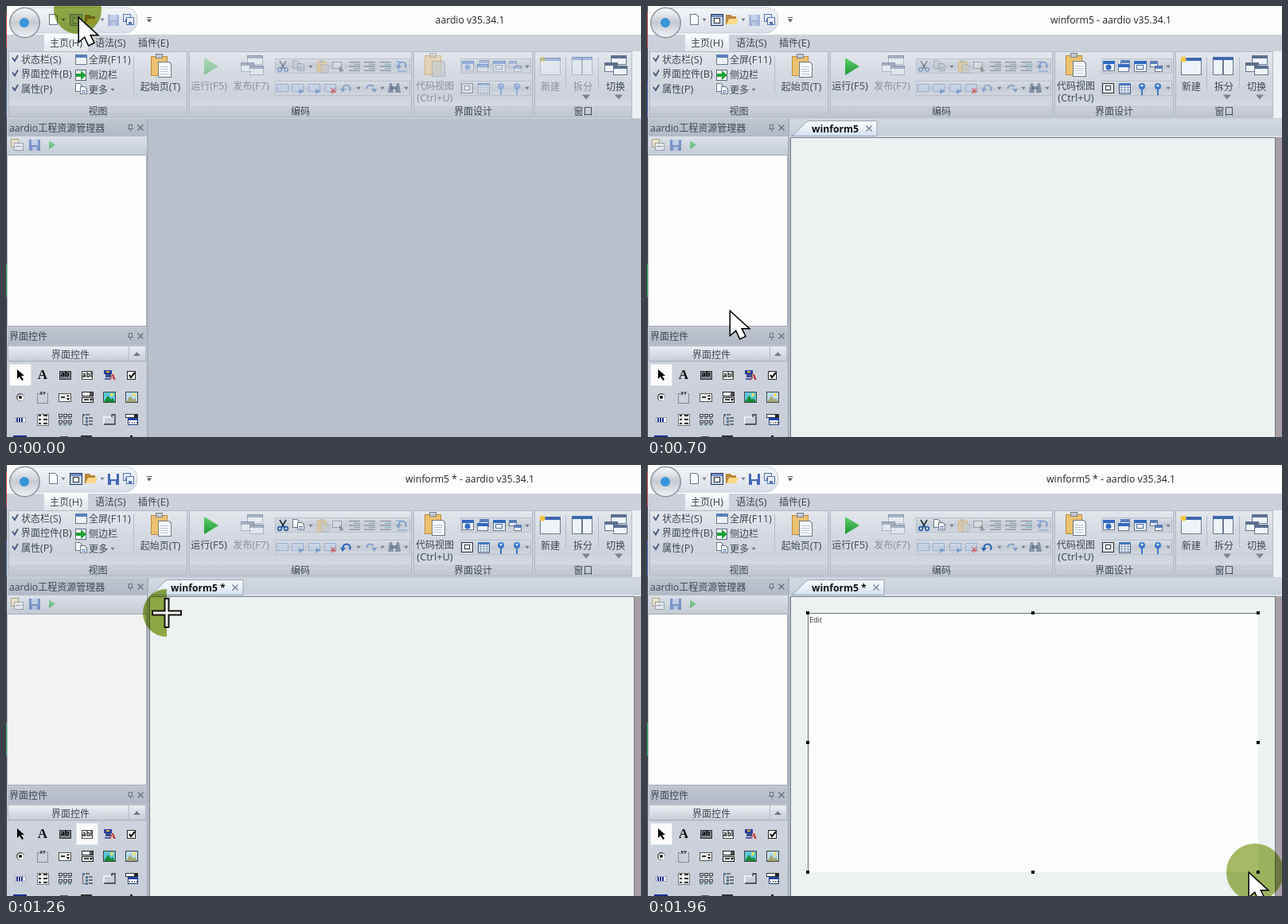
An HTML page with a canvas for the animation above (2100 ms loop, 798 by 542 pixels).

```html
<!DOCTYPE html>
<html lang="zh">
<head>
<meta charset="utf-8">
<style>
html, body { margin: 0; width: 798px; height: 542px; overflow: hidden; background: #b9c0cb; }
canvas { display: block; }
</style>
</head>
<body>
<canvas id="stage" width="798" height="542"></canvas>
<script>
const g = document.getElementById('stage').getContext('2d');
const LOOP = 2100;
const LATIN = '"Open Sans", "Noto Sans", sans-serif';
const CJK = '"Noto Sans CJK SC", "Noto Sans CJK", sans-serif';
const INK = '#3f4753', DIM = '#8b919b', NAVY = '#1c3f7c', OLIVE = '#97b048';

// ---- helpers ----
function rect(x, y, w, h, c) { g.fillStyle = c; g.fillRect(x, y, w, h); }
function frame(x, y, w, h, c) {
  g.strokeStyle = c; g.lineWidth = 1; g.strokeRect(x + .5, y + .5, w - 1, h - 1);
}
function box(x, y, w, h, fill, edge) { rect(x, y, w, h, fill); frame(x, y, w, h, edge); }
function shade(y, h, ...cols) {
  const s = g.createLinearGradient(0, y, 0, y + h);
  cols.forEach((c, i) => s.addColorStop(i / (cols.length - 1), c));
  return s;
}
function path(pts, close) {
  g.beginPath();
  for (let i = 0; i < pts.length; i += 2) g.lineTo(pts[i], pts[i + 1]);
  if (close) g.closePath();
}
function poly(c, ...pts) { path(pts, true); g.fillStyle = c; g.fill(); }
function line(c, w, ...pts) { path(pts); g.strokeStyle = c; g.lineWidth = w; g.stroke(); }
function disc(x, y, r, c) { g.beginPath(); g.arc(x, y, r, 0, 7); g.fillStyle = c; g.fill(); }
function drop(x, y, r = 2.5, c = '#747c89') { poly(c, x - r, y - r / 2, x + r, y - r / 2, x, y + r / 2 + 1); }
function fade(a, fn) { g.save(); g.globalAlpha *= a; fn(); g.restore(); }
function on(flag, fn) { fade(flag ? 1 : .4, fn); }

// Mixed text: Han runs at 12px, the rest at the given size; y is the middle.
function text(s, x, y, { c = INK, mid = false, size = 12.8, bold = '' } = {}) {
  const runs = s.split(/([\u2e80-\u9fff]+)/).filter(Boolean).map(t => {
    const font = /[\u2e80-\u9fff]/.test(t) ? `12px ${CJK}` : `${bold} ${size}px ${LATIN}`;
    g.font = font;
    return { t, font, w: g.measureText(t).width };
  });
  if (mid) x -= runs.reduce((a, r) => a + r.w, 0) / 2;
  g.fillStyle = c;
  g.textBaseline = 'alphabetic';
  for (const r of runs) { g.font = r.font; g.fillText(r.t, x, y + 4.5); x += r.w; }
}
function glyph(s, x, y, font, c = '#111') {
  g.font = font; g.fillStyle = c; g.textAlign = 'center'; g.textBaseline = 'middle';
  g.fillText(s, x, y); g.textAlign = 'left';
}

// ---- icons ----
function win(x, y, w, h, bar = '#5a7fb8') { box(x, y, w, h, '#eef3f9', '#6b788d'); rect(x, y, w, 4, bar); }
function page(x, y, w = 9, h = 12) {
  poly('#6d7888', x, y, x + w - 3, y, x + w, y + 3, x + w, y + h, x, y + h);
  poly('#fafcff', x + 1, y + 1, x + w - 3, y + 1, x + w - 1, y + 4, x + w - 1, y + h - 1, x + 1, y + h - 1);
}
function copy(x, y) { page(x, y, 9, 11); page(x + 6, y + 4, 9, 10); line('#5a7cb5', 1, x + 8, y + 9.5, x + 13, y + 9.5); line('#5a7cb5', 1, x + 8, y + 11.5, x + 13, y + 11.5); }
function form(x, y) { box(x, y, 16, 15, '#6f8fc4', '#24365c'); rect(x + 1, y + 4, 14, 10, '#c9d6ea'); box(x + 4, y + 5, 8, 7, '#fff', '#333'); }
function folder(x, y) { poly('#b98a3c', x, y + 2, x + 6, y + 2, x + 8, y + 4, x + 13, y + 4, x + 13, y + 14, x, y + 14); poly('#f9d988', x + 1, y + 14, x + 4, y + 7, x + 16, y + 7, x + 13, y + 14); }
function disk(x, y, s = 14) { rect(x, y, s, s, '#4468b8'); rect(x + 3, y, s - 6, s * .5, '#eef3fb'); rect(x + 4, y + s * .65, s - 8, s * .35, '#dbe5f5'); }
function clip(x, y, k = 1) {
  g.save(); g.translate(x, y); g.scale(k, k);
  box(0, 3, 21, 25, '#ecc16f', '#b98d40'); box(6, 0, 9, 6, '#c3c9d0', '#7c838e');
  page(9, 10, 17, 20);
  for (let i = 0; i < 4; i++) line('#b3c1d4', 1, 12, 16.5 + i * 3, 22, 16.5 + i * 3);
  g.restore();
}
function pin(x, y) { line('#6b7280', 1, x - 3, y + 1.5, x + 4, y + 1.5); frame(x - 2, y - 4, 5, 6, '#6b7280'); line('#6b7280', 1, x + .5, y + 2, x + .5, y + 5); }
function cross(x, y, r = 3.5, c = '#6b7280') { line(c, 1.4, x - r, y - r, x + r, y + r); line(c, 1.4, x + r, y - r, x - r, y + r); }
function play(x, y, w, h) { poly(shade(y, h, '#5fd06a', '#1f9638'), x, y, x + w, y + h / 2, x, y + h); }
function cascade(x, y) {
  for (const [u, v, w] of [[8, 0, 20], [0, 9, 17], [11, 13, 18]]) win(x + u, y + v, w, 12, '#5d708f');
}
function tick(x, y) { line('#45597a', 1.8, x - 3, y - 2, x, y + 2, x + 4, y - 5); }
function bubble(x, y, i) {
  box(x - 8, y - 5, 15, 10, '#c2d5ef', '#6485b8');
  if (i) poly(i > 2 ? '#cf4b3d' : '#416fb8', x + 1, y + 1, x + 8, y + 4, x + 1, y + 8);
}
function turn(x, y, d) {
  g.beginPath(); g.arc(x, y + 1, 4.5, Math.PI, d * .6 + Math.PI * 2); g.strokeStyle = '#2f66b8'; g.lineWidth = 2.2; g.stroke();
  poly('#2f66b8', x - d * 8, y + 1, x - d * 1, y + 1, x - d * 5, y + 6);
}
function lines(x, y, c) {
  for (let i = 0; i < 5; i++) line(i % 2 ? c : '#3c4656', 1.3, x - (i % 2 ? 1 : 7), y - 5.5 + i * 2.7, x + 7, y - 5.5 + i * 2.7);
}
function strip(x, y, w) { box(x, y, w, 19, shade(y, 19, '#dbdfe6', '#c6ccd5', '#d3d8df'), '#b8bec9'); }

// ---- ribbon ----
function titleBar(s) {
  rect(0, 0, 798, 37, s.hot ? '#f3f3f3' : '#fdfdfd');
  rect(0, 36, 798, 106, shade(36, 106, '#ccd1da', '#c6ccd6'));
  rect(787, 57, 11, 84, '#eef1f4');
  g.beginPath(); g.roundRect(30, 2, 135, 32, [0, 14, 16, 0]);
  g.fillStyle = shade(2, 32, '#f3f5f8', '#d9dee7'); g.fill();
  g.strokeStyle = '#c6ccd6'; g.lineWidth = 1; g.stroke();
  disc(23.5, 21, 19.5, '#8d939c');
  disc(23.5, 21, 18, shade(3, 36, '#f6f7f9', '#c5cad2', '#eef0f3'));
  disc(23, 21, 6, '#3a94d8');
  page(54, 10, 11, 14); drop(72, 17);
  on(s.open, () => form(80, 10));
  folder(99, 9); drop(121, 17);
  on(s.dirty, () => disk(128, 11));
  for (const [x, y] of [[147, 10], [151, 14]]) { box(x, y, 10, 10, '#e6ecf6', '#5674b4'); rect(x + 3, y + 6, 4, 4, '#5674b4'); }
  line('#555', 1, 177, 14.5, 183, 14.5); drop(180, 18, 3, '#555');
  const name = s.dirty ? 'winform5 * - ' : s.t >= 140 ? 'winform5 - ' : '';
  text(name + 'aardio v35.34.1', 583, 17, { mid: true, size: 12.2, c: '#222' });
  rect(48, 36, 55, 22, shade(36, 22, '#fafbfc', '#e0e4ea'));
  text('主页(H)', 55, 46); text('语法(S)', 112, 46); text('插件(E)', 166, 46);
}
function group(x, r, label) {
  box(x, 57, r - x, 83, shade(57, 83, '#e3e7ec', '#d5dae2', '#cdd3dc', '#dce1e7'), '#b3bac5');
  rect(x + 1, 125, r - x - 2, 14, shade(125, 14, '#cbd0d9', '#c0c6d0'));
  text(label, (x + r) / 2, 132, { mid: true });
}
function ribbon(s) {
  group(3, 228, '视图'); group(230, 510, '编码'); group(512, 662, '界面设计'); group(664, 787, '窗口');
  ['状态栏(S)', '界面控件(B)', '属性(P)'].forEach((t, i) => { tick(11, 67 + i * 18.5); text(t, 19, 67 + i * 18.5); });
  win(87, 61, 15, 13); box(87, 80, 14, 14, '#fff', '#596780');
  poly('#1fa035', 88, 85, 94, 85, 94, 81, 101, 87, 94, 93, 94, 89, 88, 89);
  copy(87, 97);
  text('全屏(F11)', 104, 67); text('侧边栏', 104, 86); text('更多', 104, 105); drop(134, 105);
  line('#b5bbc6', 1, 160.5, 62, 160.5, 110);
  clip(182, 60); text('起始页(T)', 194, 101, { mid: true });

  const live = s.open ? INK : DIM;
  on(s.open, () => play(249, 65, 18, 22));
  text('运行(F5)', 255, 100, { mid: true, c: live });
  fade(.45, () => cascade(295, 62));
  text('发布(F7)', 308, 100, { mid: true, c: DIM });

  strip(338, 66, 170); strip(338, 94, 170);
  on(s.dirty, () => {
    line('#26334a', 1.7, 344, 69, 350, 79); line('#26334a', 1.7, 352, 69, 346, 79);
    for (const x of [344, 352]) { g.beginPath(); g.arc(x, 80, 2.3, 0, 7); g.strokeStyle = '#2c5fae'; g.stroke(); }
    copy(360, 68); turn(428, 103, 1);
  });
  fade(.45, () => {
    clip(391, 68, .55);
    box(410, 70, 12, 9, '#e4e8ee', '#555'); poly('#555', 419, 75, 425, 82, 419, 83);
    lines(438, 76, '#566'); lines(457, 76, '#566'); lines(477, 76, '#2c9b9b');
    line('#3a7ac4', 1.5, 490, 70, 496, 70); line('#3a7ac4', 1.5, 492, 82, 504, 82);
    turn(498, 74, 1);
    [348, 367, 388, 408].forEach((x, i) => bubble(x, 103, i));
    cross(411, 106, 3, '#c33');
    turn(458, 103, -1);
    for (const x of [480, 489]) { poly('#2e4468', x + 2, 97, x + 5, 97, x + 7, 109, x, 109); }
    rect(484, 101, 7, 4, '#2e4468');
  });
  drop(383, 76); [443, 473, 503].forEach(x => drop(x, 103));

  on(s.open, () => clip(526, 59));
  text('代码视图', 539, 100, { mid: true, c: live });
  text('(Ctrl+U)', 539, 115, { mid: true, c: live });
  strip(571, 66, 89); strip(571, 94, 89);
  on(s.open, () => {
    win(573, 69, 15, 13, '#3269bd'); disc(580, 77, 3.5, '#356cc0');
    win(595, 68, 12, 10); win(592, 73, 14, 10, '#3269bd');
    win(612, 69, 16, 14, '#3269bd'); frame(615, 74, 9, 6, '#4b6fa8');
    win(632, 69, 10, 8); win(638, 75, 10, 8);
    box(572, 97, 15, 13, '#dfe6ef', '#333'); box(576, 100, 7, 6, '#fff', '#333');
    box(593, 97, 15, 14, '#eef3fa', '#4c5c78'); rect(593, 97, 15, 3, '#4a78bd');
    for (let i = 0; i < 3; i++) { line('#8fa3c2', 1, 594, 102.5 + i * 3, 607, 102.5 + i * 3); line('#8fa3c2', 1, 596.5 + i * 4, 100, 596.5 + i * 4, 110); }
    for (const x of [622, 642]) { disc(x, 101, 4, '#3b76c8'); disc(x, 100, 1.6, '#d8e7fb'); rect(x - 1, 104, 2, 8, '#3b76c8'); }
  });
  drop(655, 76); drop(655, 103);

  on(s.open, () => {
    win(671, 65, 26, 22, '#3f68ad'); disc(674, 67, 3.5, '#f1c844');
    win(711, 64, 13, 23, '#3f68ad'); win(724, 64, 13, 23, '#3f68ad');
  });
  text('新建', 684, 101, { mid: true, c: live });
  text('拆分', 725, 101, { mid: true, c: live });
  cascade(752, 62); text('切换', 766, 101, { mid: true });
  drop(729, 114, 5, '#7b828d'); drop(770, 114, 5, '#7b828d');
  line('#b5bbc6', 1, 703.5, 64, 703.5, 104); line('#b5bbc6', 1, 744.5, 64, 744.5, 104);
}

// ---- side panels ----
function header(y, label, hot) {
  rect(2, y, 175, 21, hot ? shade(y, 21, '#e6ecf3', '#d5dee9') : shade(y, 21, '#bdc4ce', '#b3bac5'));
  text(label, 4, y + 10, { size: 12.2 });
  pin(156, y + 10); cross(169, y + 10);
}
function valueBox(x, y, w, s) { box(x - w / 2, y - 5, w, 11, '#fff', '#444'); glyph(s, x, y + .5, `bold 8px ${LATIN}`); }
function picture(x, y, sky, land) {
  box(x - 8, y - 7, 16, 14, sky, '#444');
  disc(x + 3, y - 3, 2, '#f7df56');
  poly(land, x - 7, y + 6, x - 2, y - 2, x + 2, y + 3, x + 4, y + 1, x + 7, y + 6);
}
const tools = [
  (x, y) => poly('#000', x - 4, y - 7, x - 4, y + 5, x - 1, y + 2, x + 2, y + 7, x + 4, y + 6, x + 1, y + 1, x + 5, y + 1),
  (x, y) => glyph('A', x, y + 1, 'bold 17px "Liberation Serif", serif'),
  (x, y) => { box(x - 7, y - 5, 15, 11, '#7d8188', '#333'); glyph('ab', x, y, `bold 9px ${LATIN}`, '#000'); },
  (x, y) => valueBox(x, y, 14, 'abl'),
  (x, y) => { rect(x - 7, y - 6, 10, 5, '#2a3c9c'); rect(x - 5, y - 1, 7, 4, '#3d4f8a'); rect(x - 4, y - 5, 4, 2, '#e0b531'); line('#2a3c9c', 1.5, x - 6, y + 5, x + 1, y + 5); glyph('A', x + 4, y + 3, 'bold 11px "Liberation Serif", serif', '#c02020'); },
  (x, y) => { box(x - 6, y - 5, 11, 11, '#fff', '#222'); line('#000', 2, x - 3, y, x - 1, y + 3, x + 4, y - 3); },
  (x, y) => { disc(x, y, 5, '#555'); disc(x + .5, y + .5, 4, '#fff'); disc(x, y, 2, '#000'); },
  (x, y) => { frame(x - 7, y - 5, 14, 13, '#858b95'); rect(x - 4, y - 8, 9, 6, '#d0d5dd'); glyph('XY', x, y - 5, `bold 6px ${LATIN}`); },
  (x, y) => { box(x - 8, y - 5, 16, 11, '#eee', '#555'); rect(x - 5, y - 1, 5, 2, '#333'); drop(x + 4, y + 2, 2, '#000'); poly('#000', x + 2, y - 1, x + 6, y - 1, x + 4, y - 3); },
  (x, y) => { box(x - 7, y - 7, 15, 6, '#fff', '#222'); rect(x + 3, y - 6, 4, 4, '#555'); box(x - 7, y, 15, 7, '#eee', '#222'); rect(x - 4, y + 2, 6, 2, '#444'); drop(x + 5, y + 3, 2, '#000'); },
  (x, y) => picture(x, y, '#5cc8d8', '#188a35'),
  (x, y) => picture(x, y, '#b9dcf2', '#a3a878'),
  (x, y) => { box(x - 7, y - 3, 14, 7, '#fff', '#9aa3b0'); for (let i = 0; i < 3; i++) rect(x - 5 + i * 3, y - 2, 2, 5, '#1d2d9d'); },
  (x, y) => { box(x - 7, y - 7, 15, 15, '#f0f1f3', '#777'); for (const j of [-5, 0, 5]) { rect(x - 5, y + j - 1, 3, 2, '#333'); rect(x + 1, y + j - 1, 5, 2, '#333'); } },
  (x, y) => { for (let i = 0; i < 6; i++) { const u = x - 8 + i % 3 * 6, v = y - 7 + (i / 3 | 0) * 8; frame(u, v, 5, 4, '#444'); line('#46696a', 1.3, u, v + 5.5, u + 4, v + 5.5); } },
  (x, y) => { line('#666', 1, x - 5.5, y - 7, x - 5.5, y + 6.5, x - 2, y + 6.5); for (const j of [-6, -2, 2, 6]) { const d = j > -6 ? 2 : -2; line('#333', 1.2, x + d, y + j, x + d + 5, y + j); rect(x + d - 4, y + j - 1, 3, 3, '#5b7790'); } },
  (x, y) => { line('#f8f8f8', 1.5, x - 7, y + 6, x - 7, y - 3, x + 3, y - 3); line('#333', 1.3, x - 7, y + 6, x + 7, y + 6, x + 7, y - 6, x + 3, y - 6, x + 3, y - 3); },
  (x, y) => { box(x - 8, y - 7, 16, 5, '#fff', '#333'); rect(x + 3, y - 6, 4, 3, '#222'); box(x - 5, y - 2, 13, 9, '#fff', NAVY); rect(x - 5, y - 2, 13, 3, '#2342a5'); for (let i = 0; i < 4; i++) rect(x - 3 + i * 3, y + 3, 1, 2, '#555'); }
];
function panels(s) {
  rect(0, 142, 179, 400, '#c1c8d2');
  header(143, 'aardio工程资源管理器');
  rect(2, 164, 175, 23, shade(164, 23, '#dce1e8', '#c4cbd5'));
  fade(.6, () => { box(6, 167, 10, 11, '#f0e2bd', '#8c8468'); box(10, 172, 12, 10, '#f4f6f9', '#6a7584'); line('#6a86b0', 1, 12, 176.5, 20, 176.5); disk(29, 168); play(54, 169, 8, 11); });
  box(1, 187, 176, 216, s.t >= 860 && s.t < 1400 ? '#f2f2f2' : '#fdfdfd', '#a5acb8');
  header(405, '界面控件', s.hot);
  box(2, 427, 174, 20, shade(427, 20, '#eceff3', '#c7cdd6'), '#aeb5c0');
  text('界面控件', 81, 438, { mid: true });
  line('#b4bac5', 1, 154.5, 428, 154.5, 446);
  poly('#737b88', 160, 440, 169, 440, 164.5, 435);
  rect(2, 448, 174, 94, shade(448, 94, '#ced3dc', '#c8ced8'));
  if (s.tool >= 0) box(4 + s.tool * 28, 450, 28, 28, s.hover ? '#e2e5ea' : '#fbfbfb', '#dde1e7');
  tools.forEach((fn, i) => fn(18 + i % 6 * 28, 464 + (i / 6 | 0) * 28));
  rect(9, 540, 17, 2, '#1d318f'); rect(68, 541, 10, 1, '#555'); rect(94, 540, 14, 2, '#333'); rect(156, 540, 3, 2, '#222');
}

// ---- work area ----
function opening(alpha) {
  fade(alpha, () => {
    box(204, 168, 529, 354, '#b1cae7', '#43668a');
    rect(205, 169, 527, 26, shade(169, 26, '#99b3d2', '#a9c3e1'));
    rect(210, 196, 517, 320, '#b9c0cb');
    rect(205, 223, 5, 19, '#e7eef5'); rect(727, 231, 5, 11, '#e7eef5');
    rect(221, 503, 477, 17, '#ecf1f2'); rect(221, 507, 400, 10, '#868686');
    text('winform5', 212, 185, { size: 12.2, c: '#111' });
  });
}
function designer(s) {
  const end = s.dirty ? 298 : 289;
  rect(179, 142, 619, 24, shade(142, 24, '#d2d8e1', '#c6cdd7'));
  rect(179, 163, 619, 3, '#dce2ea');
  path([181, 163.5, 184, 162, 200, 146, 204, 144.5, end, 144.5, end, 163.5], true);
  g.fillStyle = shade(144, 20, '#fafcfe', '#e9f0f9', '#cfddf1'); g.fill();
  g.strokeStyle = '#9aa4b4'; g.lineWidth = 1; g.stroke();
  text(s.dirty ? 'winform5 *' : 'winform5', 207, 154, { size: 12.2, bold: 'bold', c: '#111' });
  cross(end - 10, 154, 3.5, '#7d8592');
  box(180, 165, 610, 380, '#ecf1f1', '#737b85');
  rect(790, 165, 8, 377, '#a89fa4');
  if (!s.size) return;
  const [r, b] = s.size;
  rect(202, 186, r - 202, b - 186, '#fdfdfd');
  line('#6e6e6e', 1, 202.5, b, 202.5, 186.5, r, 186.5);
  text('Edit', 204, 193, { size: 9, c: '#333' });
  for (const x of [202, (202 + r) / 2 | 0, r])
    for (const y of [186, (186 + b) / 2 | 0, b])
      if (x === 202 || x === r || y === 186 || y === b) rect(x - 2, y - 2, 4, 4, '#000');
}

// ---- pointer ----
function halo([x, y, r, a, half]) {
  g.beginPath();
  half ? g.arc(x, y, r, Math.PI / 2, Math.PI * 1.5) : g.arc(x, y, r, 0, 7);
  fade(a, () => { g.globalCompositeOperation = 'multiply'; g.fillStyle = OLIVE; g.fill(); });
}
function arrow(x, y) {
  path([0, 0, 0, 28, 7, 22, 12, 33, 18, 30, 13, 20, 22, 20].map((v, i) => v + (i % 2 ? y : x)), true);
  g.lineJoin = 'miter'; g.strokeStyle = '#000'; g.lineWidth = 3; g.stroke();
  g.fillStyle = '#fff'; g.fill();
}
function plus(x, y) {
  for (const [c, w, r] of [['#17130f', 7, 19], ['#f6f6f4', 3, 17]]) {
    line(c, w, x - r, y, x + r, y); line(c, w, x, y - r, x, y + r);
  }
}

// halo: x, y, radius, alpha, left half only
const steps = [
  { t: 0, at: [92, 16], halo: [90, 5, 30, 1] },
  { t: 140, at: [92, 16], halo: [91, 5, 31, .8] },
  { t: 280, at: [92, 16], halo: [92, 6, 33, .6] },
  { t: 440, at: [92, 16], halo: [91, 6, 34, .4] },
  { t: 580, at: [98, 150] },
  { t: 700, at: [105, 385] },
  { t: 860, at: [107, 463], halo: [105, 458, 30, 1, true] },
  { t: 1000, at: [107, 463], halo: [105, 458, 34, .6] },
  { t: 1120, at: [152, 310] },
  { t: 1260, at: [202, 186], halo: [202, 186, 30, 1, true] },
  { t: 1400, at: [560, 407], halo: [530, 388, 30, 1, true], size: [545, 398] },
  { t: 1560, at: [735, 515], halo: [714, 505, 30, 1, true], size: [723, 508] },
  { t: 1720, at: [768, 517], halo: [764, 512, 30, 1, true], size: [768, 512] },
  { t: 1960, at: [757, 514], halo: [764, 512, 36, .85], size: [768, 512] }
];
function stateAt(now) {
  const s = { ...steps.findLast(k => k.t <= now) };
  s.open = s.t >= 440;
  s.dirty = s.t >= 1260;
  s.hot = s.t >= 860 && s.t < 1260;
  s.hover = s.t === 860;
  s.tool = s.t >= 860 && s.t < 1960 ? 3 : 0;
  s.drag = s.t >= 1260 && s.t < 1960;
  return s;
}

function draw(s) {
  rect(0, 0, 798, 542, '#b9c0cb');
  titleBar(s);
  ribbon(s);
  panels(s);
  rect(0, 0, 1, 542, '#3a3b42');
  rect(0, 8, 1, 44, '#b33a34'); rect(0, 95, 1, 45, '#4355a0'); rect(0, 324, 1, 42, '#2fa865');
  rect(177, 142, 2, 400, '#aab2be');
  if (s.open) designer(s);
  else if (s.t >= 140) opening(s.t < 280 ? .7 : 1);
  if (s.halo) halo(s.halo);
  (s.drag ? plus : arrow)(...s.at);
}

const start = performance.now();
let shown = -1;
function loop(now) {
  const s = stateAt(Math.max(0, now - start) % LOOP);
  if (s.t !== shown) { draw(s); shown = s.t; }
  requestAnimationFrame(loop);
}
draw(stateAt(0));
requestAnimationFrame(loop);
</script>
</body>
</html>
```
